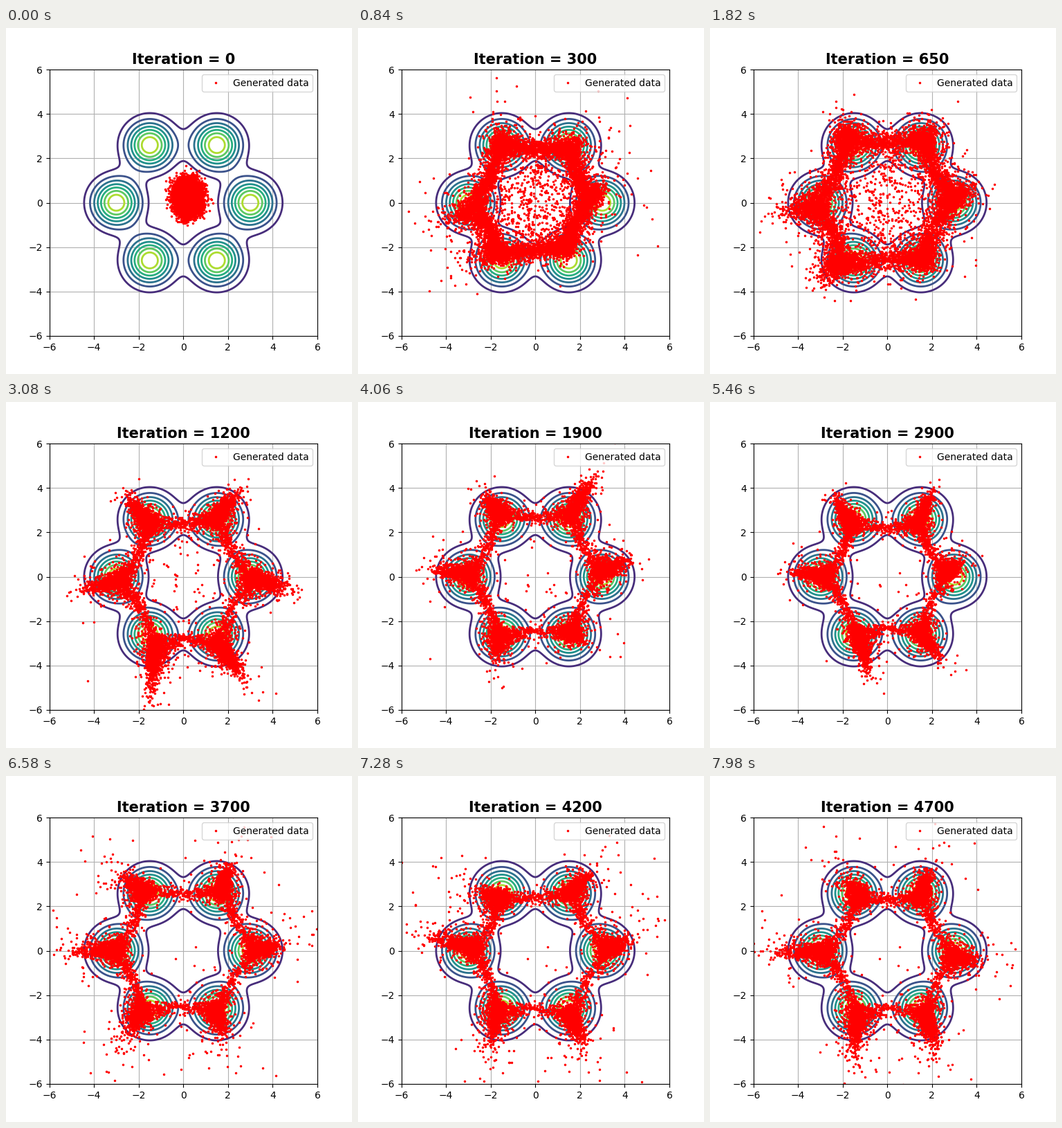
Write a matplotlib script that moves like this. It is 500x500 px and loops after 8 s.

```python
import numpy as np
import matplotlib.pyplot as plt
from matplotlib.animation import FuncAnimation

LOOP, INTERVAL, STEP = 8000, 40, 140  # ms
N = 10000

# Training stages: inner anchor and outward tail of the samples at each mode.
TIMES = np.array([13, 22, 29, 39, 47, 57])
BASES = np.array([
    [2.7 + .15j, 1.5 + 2.75j, -1.8 + 2.65j, -2.9 - .1j, -1.9 - 2.6j, 1.4 - 2.5j],
    [2.85 + 0j, 1.35 + 2.5j, -1.4 + 2.25j, -2.6 - .1j, -1.2 - 2.8j, 1.4 - 2.8j],
    [2.8 + .2j, 1.45 + 2.6j, -1.5 + 2.75j, -2.75 + .05j, -1.6 - 2.5j, 1.45 - 2.45j],
    [2.55 + .1j, 1.3 + 2.2j, -1.5 + 2.2j, -2.6 + 0j, -1.4 - 2.35j, 1.35 - 2.3j],
    [3.1 + 0j, 1.7 + 2.55j, -1.65 + 2.6j, -2.8 + 0j, -1.75 - 2.55j, 1.35 - 2.5j],
    [2.8 - .2j, 1.45 + 2.3j, -1.2 + 2.3j, -2.6 - .05j, -1.35 - 2.6j, 1.6 - 2.6j],
])
TAILS = np.array([
    [.9 + .4j, .4 + .4j, -.1 + .7j, -1.5 - .3j, -.8 - .6j, .4 - .1j],
    [1.5 - .4j, .8 + 1j, -.8 + 1j, -1.4 - .35j, -.2 - 1.9j, 1 - 1.4j],
    [1 + .4j, .85 + 1.4j, -.5 + .6j, -1.3 + .2j, -.1 - .7j, .4 - .2j],
    [.5 + .4j, .5 + 1.2j, -.6 + 1j, -1.2 + .15j, .4 - 1.4j, .7 - 1j],
    [.8 + .2j, .25 + .9j, -.7 + .5j, -1.5 + 0j, -.5 - .8j, .3 - .9j],
    [.8 - .15j, .3 + .9j, -.4 + .6j, -1.7 + 0j, -.1 - 1.4j, .4 - 1.3j],
])
SPREAD = [.25, .17, .16, .14, .16, .16]
WILD = [.4, .4, .4, .35, .8, .8]
SHARP = [2.3, 5.5, 6.5, 7, 7, 7.5]
HOLLOW = [.045, .007, .003, .002, .001, .001]

rng = np.random.default_rng(7)


def cnormal():
    return rng.normal(size=N) + 1j * rng.normal(size=N)


# Fixed latent noise; the angle decides the mode or the bridge between two.
latent = cnormal()
turn = np.angle(latent) / (np.pi / 3)
near = np.round(turn).astype(int)
side = np.sign(turn - near).astype(int)
gap = 2 * np.abs(turn - near)
mode, neighbour = near % 6, (near + side) % 6
noise = cnormal() * (.6 + .45 * rng.exponential(size=N))
reach = .5 * np.abs(rng.normal(size=N))
stray = (rng.random(N) < .08) * rng.exponential(size=N)
stray_dir = .45 * cnormal()
rank = rng.random(N)
disk = 2.1 * np.sqrt(rng.random(N)) * np.exp(2j * np.pi * rng.random(N))


def smooth(x):
    x = np.clip(x, 0, 1)
    return x * x * (3 - 2 * x)


def samples(k):
    i = int(np.clip(np.searchsorted(TIMES, k, side="right") - 1, 0, 4))
    tau = np.clip((k - TIMES[i]) / (TIMES[i + 1] - TIMES[i]), 0, 1)

    def mix(values):
        return values[i] + (values[i + 1] - values[i]) * smooth(tau)

    early = min(k / TIMES[0], 1)
    sway = np.sin(np.pi * (tau if early == 1 else early)) ** 2
    phase = 1.7 * k + 2.1 * np.arange(6)
    base = mix(BASES) + .15 * sway * np.exp(1j * phase)
    tail = mix(TAILS) * np.exp(.5j * sway * np.sin(1.3 * phase))
    wild = mix(WILD) + .4 * np.sin(np.pi * early)
    sharp = mix(SHARP) - (1 - early)

    f = .5 * gap ** sharp
    arm = tail[mode]
    p = (1 - f) * base[mode] + f * base[neighbour]
    p = p + (1 - 2 * f) ** 2 * arm * reach + mix(SPREAD) * noise
    p = p + wild * stray * (arm / np.abs(arm) + stray_dir)
    p = np.where(rank < mix(HOLLOW), disk, p)

    blob = .2 + .25j + .28 * latent.real + .36j * latent.imag
    grow = smooth(k / 8)
    return (1 - grow) * blob + grow * p


def iteration(k):
    return 50 * k if k <= 20 else 1000 + 100 * (k - 20)


fig, ax = plt.subplots(figsize=(5, 5), dpi=100)
axis = np.linspace(-6, 6, 300)
X, Y = np.meshgrid(axis, axis)
centres = 3 * np.exp(1j * np.pi / 3 * np.arange(6))
Z = sum(np.exp(-(X - c.real) ** 2 - (Y - c.imag) ** 2) for c in centres) / np.pi
ax.contour(X, Y, Z, levels=np.arange(9) * .04, cmap="viridis", linewidths=2)
dots, = ax.plot([], [], "r.", markersize=3, label="Generated data")
ax.set(xlim=(-6, 6), ylim=(-6, 6))
ax.grid(True)
ax.legend(loc="upper right")
title = ax.set_title("", fontsize=15, fontweight="bold")


def update(frame):
    k = (frame * INTERVAL + INTERVAL // 2) // STEP
    p = samples(k)
    dots.set_data(p.real, p.imag)
    title.set_text(f"Iteration = {iteration(k)}")
    return dots, title


anim = FuncAnimation(fig, update, frames=LOOP // INTERVAL, interval=INTERVAL,
                     repeat=True, repeat_delay=0)
plt.show()
```
